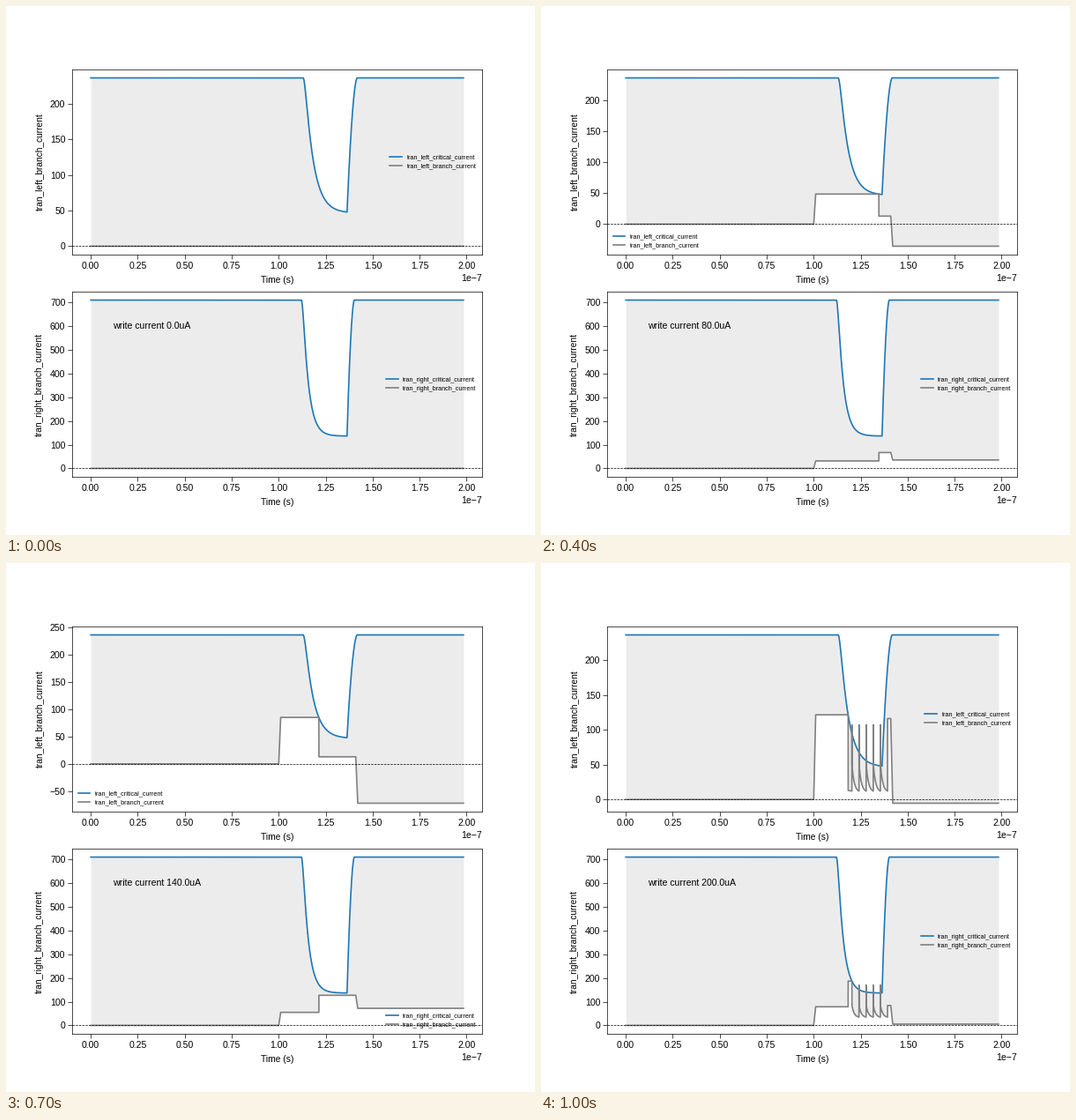
Recreate the animation shown at these times as a matplotlib script. Size 600x600 px, loop 1.1 s.

```python
import numpy as np
import matplotlib.pyplot as plt
from matplotlib.animation import FuncAnimation

plt.rcParams.update({
    "font.family": "Liberation Sans", "font.size": 7.6,
    "axes.linewidth": 0.5, "lines.linewidth": 1.2,
    "xtick.major.width": 0.5, "ytick.major.width": 0.5,
    "xtick.major.pad": 2.5, "ytick.major.pad": 2,
})

UNIT = 1e-7          # time unit used below
STEP = 1e-4          # width of a sudden jump
SHARE = 0.607        # part of the write current taken by the left branch
HOLD = 13            # left current once the right branch has taken over
HEAT_OFF = 1.3635    # time at which the critical currents recover
GRID = np.linspace(0, 2, 4001)


def critical_curve(top, low, start, rate, lag, end):
    """Critical current: lagged exponential fall, then a fast eased recovery."""
    def curve(t):
        d = np.clip(t - start, 0, None)
        fall = low + (top - low) * np.exp(-rate * (d - lag * (1 - np.exp(-d / lag))))
        p = np.clip((t - HEAT_OFF) / (end - HEAT_OFF), 0, 1)
        return fall + (top - fall) * (1 - (1 - p) ** 1.8)
    return curve


left_critical = critical_curve(236, 46.5, 1.130, 22, 0.011, 1.418)
right_critical = critical_curve(710, 136.5, 1.1205, 33, 0.009, 1.4025)


def first_below(curve, level):
    """Time at which the critical current drops under level, or None."""
    t = np.linspace(1, 1.41, 8201)
    under = curve(t) < level
    return t[under.argmax()] if under.any() else None


def branches(iw, end):
    """Vertices (time, left, right) of both branch currents."""
    feed = np.array([SHARE, 1 - SHARE]) * iw
    path = [(0, 0, 0), (1.0, 0, 0), (1.01, *feed)]
    state = feed
    switch = first_below(left_critical, feed[0])
    if switch:
        path.append((switch, *feed))
        state = np.array([HOLD, iw - HOLD])
        path.append((switch + STEP, *state))
        start = first_below(right_critical, state[1])
        if start:
            state = oscillate(path, iw, start)
    path += [(1.41, *state), (1.42, *(state - feed)), (end, *(state - feed))]
    return np.array(path).T


def oscillate(path, iw, start):
    """Append the relaxation spikes and return the currents they settle at."""
    period = 0.02874 + (iw - 160) * 0.00023
    peak = 76 + (iw - 160) * 0.775
    high = iw - HOLD
    u = np.linspace(0, 1, 16)
    fade = (np.exp(-3.2 * u) - np.exp(-3.2)) / (1 - np.exp(-3.2))
    t = start
    while t < HEAT_OFF:
        path += [(t, HOLD - 1, high), (t + STEP, peak, 85)]
        path += zip(t + 4 * STEP + u * (period - 5 * STEP),
                    12 + 38 * fade, 35 + 48 * fade)
        t += period
        high = min(iw - HOLD, 170)
    if t > 1.385:
        left = SHARE * iw - 5.4
    else:
        path.append((t, peak, 85))
        left = HOLD
    path.append((t + STEP, left, iw - left))
    return np.array([left, iw - left])


def draw_panel(ax, side, curve, t_branch, current, loc):
    ax.clear()
    t = np.union1d(t_branch, GRID[GRID < t_branch[-1]])
    crit = curve(t)
    flow = np.interp(t, t_branch, current)
    ax.plot(t * UNIT, crit, color="tab:blue", label=f"tran_{side}_critical_current")
    ax.plot(t * UNIT, flow, color="grey", label=f"tran_{side}_branch_current")
    ax.fill_between(t * UNIT, flow, crit, color="grey", alpha=0.15, lw=0)
    ax.axhline(0, color="black", ls="--", lw=0.5)
    ax.set_xlabel("Time (s)", fontsize=7.4)
    ax.set_ylabel(f"tran_{side}_branch_current", fontsize=7.3, labelpad=5)
    ax.legend(loc=loc, fontsize=5.2, frameon=False, labelspacing=0.4,
              handlelength=1.92, handletextpad=0.77)


fig, (top, bottom) = plt.subplots(2, 1, figsize=(6, 6), dpi=100)


def update(i):
    iw = 20.0 * i
    t, left, right = branches(iw, 1.983)
    draw_panel(top, "left", left_critical, t, left,
               "lower left" if left[-1] < -20 else "center right")
    draw_panel(bottom, "right", right_critical, t, right,
               "lower right" if right[-1] > 55 else "center right")
    bottom.text(0.1, 0.8, f"write current {iw:.1f}uA", transform=bottom.transAxes)
    return []


anim = FuncAnimation(fig, update, frames=11, init_func=lambda: [],
                     interval=100, repeat=True, repeat_delay=0)
plt.show()
```
